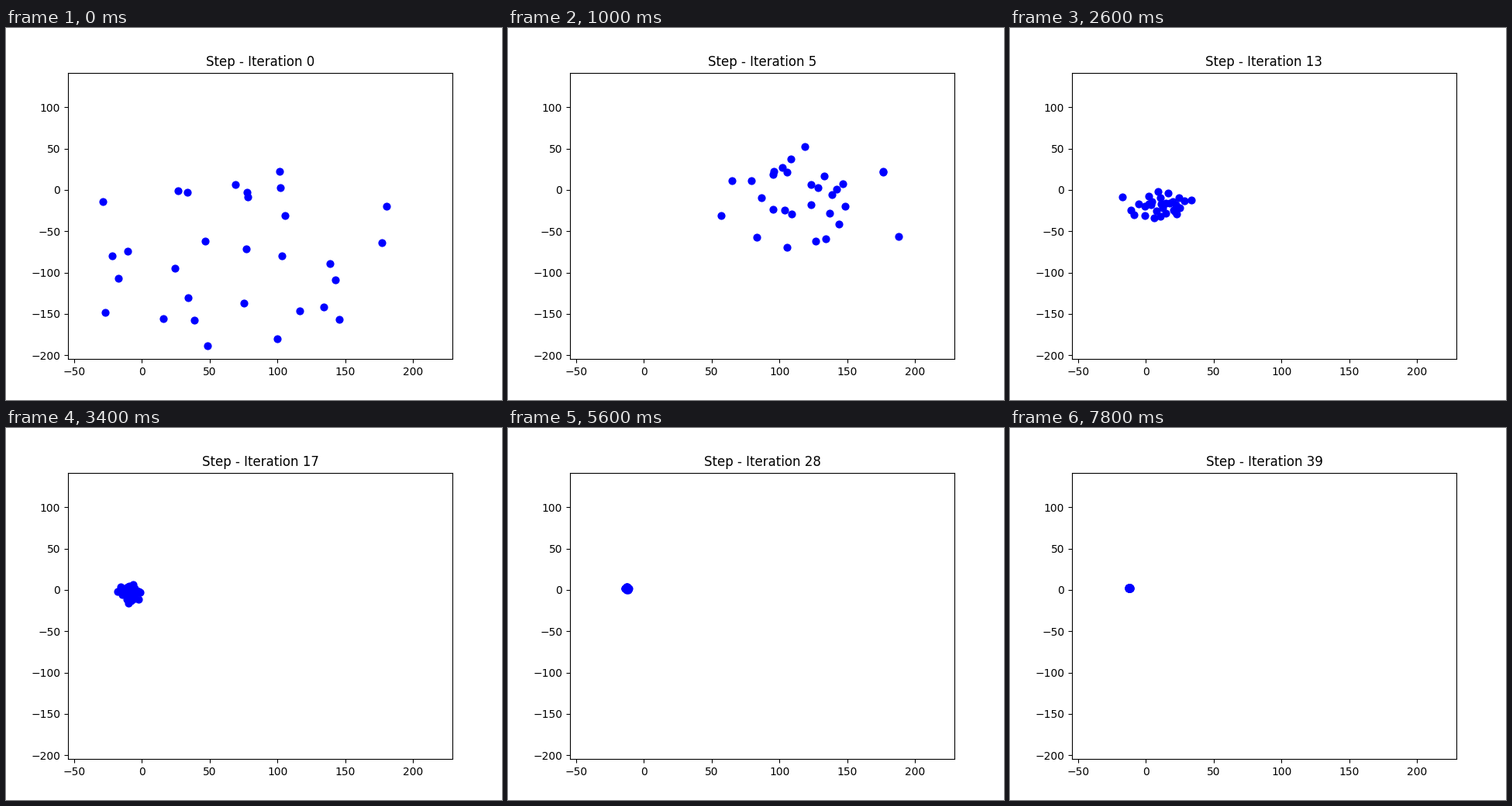
A matplotlib script for the animation above (8000 ms loop, 640 by 480 pixels).

```python
import matplotlib.pyplot as plt
import numpy as np
from matplotlib.animation import FuncAnimation

STEPS, STEP_MS, COUNT = 40, 200, 30

# Swarm at a few steps: centre x, centre y, spread x, spread y
KEYS = np.array([0, 5, 9, 13, 17, 28, 39])
CENTRE = np.array([(69.6, -80.7), (119.4, -8.5), (37.5, -25.4), (10.6, -18.8),
                   (-8.8, -3.8), (-12.5, 1.8), (-12.2, 2.3)])
SPREAD = np.array([(59, 63), (31, 32), (17.7, 14.5), (12, 8.4),
                   (4, 6), (0.7, 1.1), (0.25, 0.4)])
SLOPE = np.gradient(CENTRE, KEYS, axis=0)

# Each particle swings between two random places around the centre
rng = np.random.default_rng(7)
place_a = rng.uniform(-1.7, 1.7, (COUNT, 2))
place_b = rng.normal(0, 1, (COUNT, 2))
rate = rng.uniform(0.25, 0.5, (COUNT, 1))


def centre(step):
    """Smooth curve through the key centres, overshooting a little."""
    i = min(np.searchsorted(KEYS, step, side="right") - 1, len(KEYS) - 2)
    span = KEYS[i + 1] - KEYS[i]
    u = (step - KEYS[i]) / span
    blend = u * u * (3 - 2 * u)
    bend = span * u * (1 - u) * ((1 - u) * SLOPE[i] - u * SLOPE[i + 1])
    return CENTRE[i] * (1 - blend) + CENTRE[i + 1] * blend + bend


def spread(step):
    """Exponential decay between the key spreads."""
    return np.exp([np.interp(step, KEYS, s) for s in np.log(SPREAD).T])


def swarm(step):
    offset = place_a * np.cos(rate * step) + place_b * np.sin(rate * step)
    offset = (offset - offset.mean(axis=0)) / offset.std(axis=0)
    return centre(step) + spread(step) * offset


fig, ax = plt.subplots(figsize=(6.4, 4.8), dpi=100)
ax.set(xlim=(-54.56, 229.2), ylim=(-204.75, 141.9),
       xticks=range(-50, 201, 50), yticks=range(-200, 101, 50))
dots = ax.scatter(*swarm(0).T, s=40, color="blue")
title = ax.set_title("Step - Iteration 0")


def draw(step):
    dots.set_offsets(swarm(step))
    title.set_text(f"Step - Iteration {step}")
    return dots, title


anim = FuncAnimation(fig, draw, frames=STEPS, interval=STEP_MS,
                     repeat=True, repeat_delay=0)
plt.show()
```
